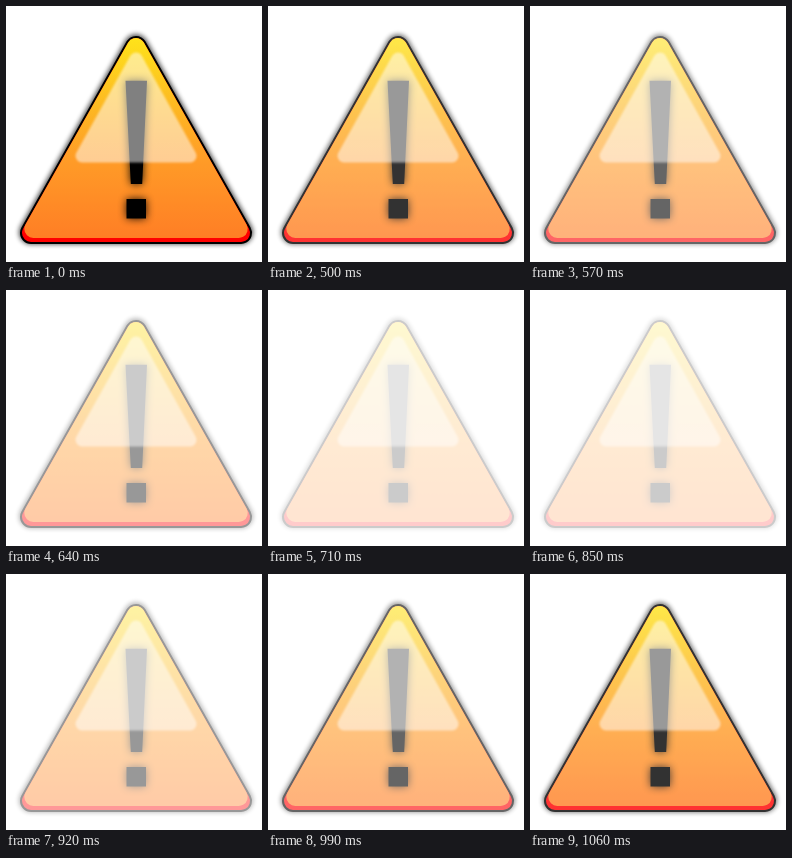
These frames come from a looping animation (256x256 px, 1130 ms). An HTML page:

```html
<!DOCTYPE html>
<html lang="en">
<head>
<meta charset="utf-8">
<title>Warning sign</title>
<style>
  html, body { margin: 0; width: 100%; height: 100%; overflow: hidden; background: #fff; }
  svg { display: block; width: 100vw; height: 100vh; }
  .round { stroke-linejoin: round; }
</style>
</head>
<body>
<svg id="sign" viewBox="0 0 256 256">
  <defs>
    <linearGradient id="body" gradientUnits="userSpaceOnUse" x1="0" y1="30" x2="0" y2="232">
      <stop offset="0" stop-color="#fee41a"/>
      <stop offset=".35" stop-color="#fdb822"/>
      <stop offset=".62" stop-color="#ff9b27"/>
      <stop offset="1" stop-color="#ff7e25"/>
    </linearGradient>
    <filter id="shadow" x="-20%" y="-20%" width="140%" height="140%"><feGaussianBlur stdDeviation="2.7"/></filter>
    <filter id="glow" x="-100%" y="-30%" width="300%" height="160%"><feGaussianBlur stdDeviation="4.5"/></filter>
    <filter id="soft"><feGaussianBlur stdDeviation="1.3"/></filter>
    <path id="triangle" class="round" d="M130 41 235 227H25Z"/>
    <path id="mark" d="M119.5 74.700H141L136.200 178H124.800ZM120.500 193H140V212.500H120.500Z"/>
  </defs>

  <use href="#triangle" y="-.8" stroke="#000" stroke-width="24" opacity=".7" filter="url(#shadow)"/>
  <use href="#triangle" stroke="#000" stroke-width="22"/>
  <use href="#triangle" fill="red" stroke="red" stroke-width="18"/>
  <path class="round" d="M130 41 232.700 223H27.300Z" fill="url(#body)" stroke="url(#body)" stroke-width="18"/>

  <use href="#mark" opacity=".9" filter="url(#glow)"/>
  <use href="#mark"/>
  <g opacity=".5" filter="url(#soft)">
    <path class="round" d="M130 53 184 150H76Z" fill="#fff" stroke="#fff" stroke-width="13"/>
  </g>
</svg>
<script>
  const HOLD = 500, STEP = 70, STEPS = 9;
  const sign = document.getElementById('sign');

  // Hold solid, then fade out and back in by fifths.
  function draw() {
    const t = performance.now() % (HOLD + STEP * STEPS);
    const step = Math.floor((t - HOLD) / STEP);
    sign.style.opacity = t < HOLD ? 1 : Math.abs(step - 4) / 5;
    requestAnimationFrame(draw);
  }
  draw();
</script>
</body>
</html>
```
